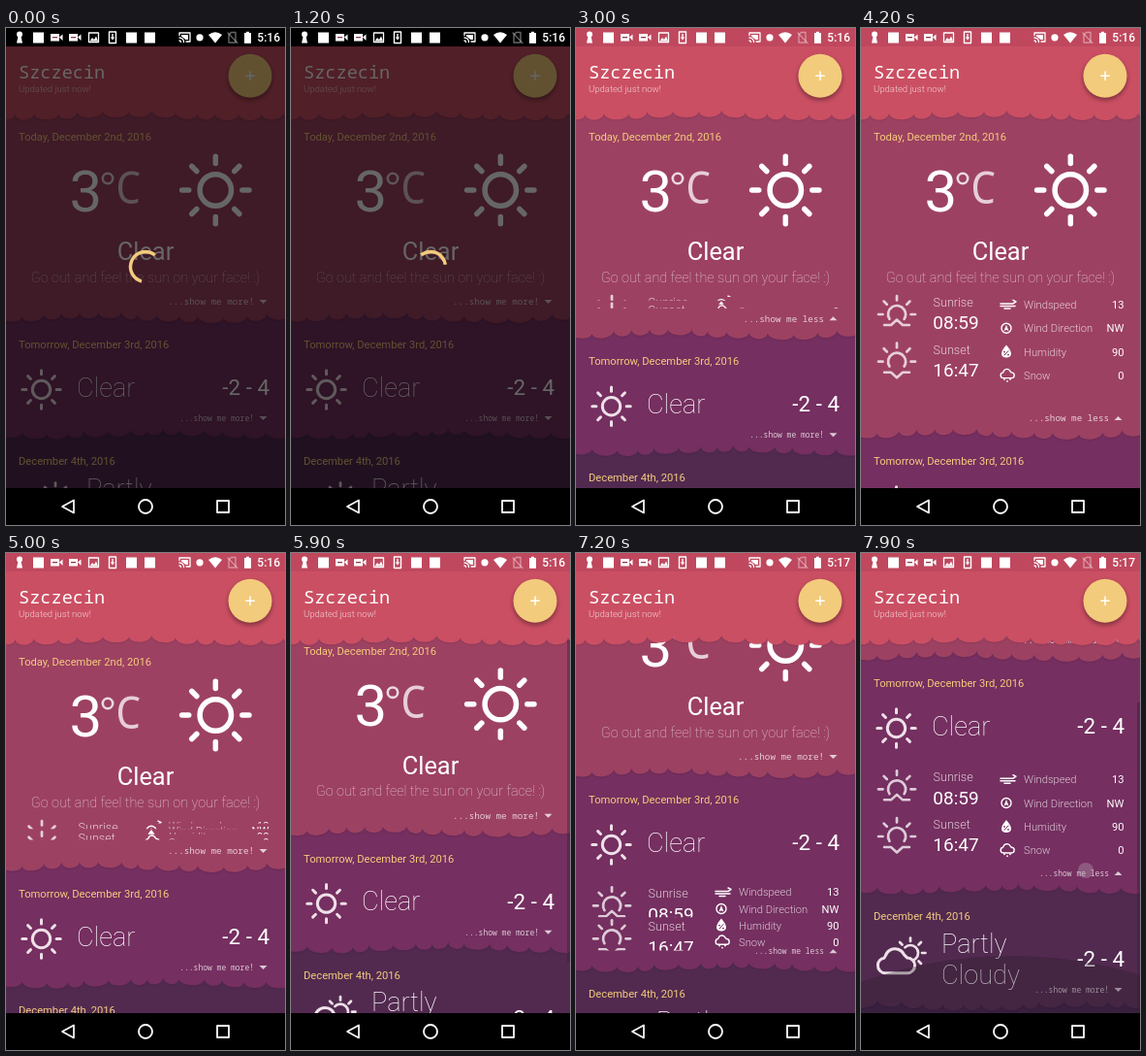
Recreate the animation shown at these times as an HTML page with a canvas. Size 288 px wide and 512 px high, loop 8 s.

```html
<!DOCTYPE html>
<html lang="en">
<head>
<meta charset="utf-8">
<title>Weather</title>
<style>
html, body { margin: 0; width: 100%; height: 100%; overflow: hidden; background: #000; }
canvas { display: block; width: 288px; height: 512px; }
</style>
</head>
<body>
<canvas id="stage"></canvas>
<script>
const W = 288, H = 512, LOOP = 8000, NAV = 474;
const TAU = Math.PI * 2;
const ROBOTO = 'Roboto, sans-serif';
const MONO = '"Noto Sans Mono", monospace';
const GOLD = '#f3cb7c', WHITE = '#fff', ICON = '#eee0e8';
const SOFT = 'rgba(255,255,255,.74)', PALE = 'rgba(255,255,255,.75)';

const canvas = document.getElementById('stage');
const c = canvas.getContext('2d');
const dpr = window.devicePixelRatio || 1;
canvas.width = W * dpr;
canvas.height = H * dpr;

const span = (t, a, b) => Math.min(1, Math.max(0, (t - a) / (b - a)));
const ease = u => (1 - Math.cos(Math.PI * u)) / 2;

// y is the middle of the capitals
function text(s, x, y, size, { weight = 400, color = WHITE, align = 'left', font = ROBOTO } = {}) {
  c.font = `${weight} ${size}px ${font}`;
  c.textAlign = align;
  c.fillStyle = color;
  c.fillText(s, x, y + size * 0.356);
}

function line(pts, width, color = WHITE, close = false) {
  c.beginPath();
  pts.forEach(([x, y], i) => i ? c.lineTo(x, y) : c.moveTo(x, y));
  if (close) c.closePath();
  c.lineWidth = width;
  c.strokeStyle = color;
  c.stroke();
}

function fill(pts, color = WHITE) {
  c.beginPath();
  pts.forEach(([x, y]) => c.lineTo(x, y));
  c.fillStyle = color;
  c.fill();
}

function arc(x, y, r, width, color = WHITE, from = 0, to = TAU) {
  c.beginPath();
  c.arc(x, y, r, from, to);
  c.lineWidth = width;
  c.strokeStyle = color;
  c.stroke();
}

function disc(x, y, r, color = WHITE) {
  c.beginPath();
  c.arc(x, y, r, 0, TAU);
  c.fillStyle = color;
  c.fill();
}

function rect(x, y, w, h, color = WHITE) {
  c.fillStyle = color;
  c.fillRect(x, y, w, h);
}

function clipped(y, h, draw) {
  c.save();
  c.beginPath();
  c.rect(0, y, W, h);
  c.clip();
  draw();
  c.restore();
}

// Panel filled down to a scalloped lower edge
function panel(y, color, seed) {
  let s = seed;
  const rnd = () => (s = (s * 16807) % 2147483647) / 2147483647;
  c.save();
  c.shadowColor = 'rgba(0,0,0,.1)';
  c.shadowBlur = 2 * dpr;
  c.shadowOffsetY = dpr;
  c.beginPath();
  c.moveTo(-20, -400);
  c.lineTo(-20, y - 3.5);
  let x = -8 - rnd() * 10, py = y - 3.5;
  c.lineTo(x, py);
  while (x < W + 10) {
    const w = 16 + rnd() * 11;
    const ny = y - 4.5 + 2.2 * Math.sin((x + seed) / 38) + rnd() * 2;
    c.bezierCurveTo(x + w * 0.08, py + 8, x + w * 0.92, ny + 8, x + w, ny);
    x += w;
    py = ny;
  }
  c.lineTo(W + 40, -400);
  c.fillStyle = color;
  c.fill();
  c.restore();
}

function ray(x, y, a, r0, r1, width, color) {
  const dx = Math.cos(a), dy = Math.sin(a);
  line([[x + dx * r0, y + dy * r0], [x + dx * r1, y + dy * r1]], width, color);
}

function sun(x, y, r, width, color) {
  arc(x, y, r, width, color);
  for (let i = 0; i < 8; i++) ray(x, y, i * TAU / 8, r * 1.7, r * 2.14, width, color);
}

function horizon(x, y, dir) {
  const col = 'rgba(255,255,255,.75)';
  arc(x, y, 9, 2.7, col, Math.PI * 0.82, Math.PI * 2.18);
  for (let i = 0; i < 5; i++) ray(x, y, Math.PI + i * Math.PI / 4, 14.5, 19, 2.7, col);
  const b = 11, tip = b - dir * 5.5;
  line([[x - 13, y + b], [x - 6, y + b], [x, y + tip], [x + 6, y + b], [x + 13, y + b]], 2.5, col);
}

function cloud(x, y, k) {
  c.beginPath();
  c.arc(x - 11 * k, y + 5 * k, 8 * k, Math.PI / 2, Math.PI * 1.45);
  c.arc(x - 1 * k, y - 2 * k, 10.5 * k, Math.PI * 1.1, Math.PI * 1.86);
  c.arc(x + 12 * k, y + 5 * k, 8 * k, Math.PI * 1.5, Math.PI * 2.5);
  c.closePath();
}

function partly(x, y) {
  const sx = x + 10, sy = y - 3;
  arc(sx, sy, 8, 2.7, ICON, Math.PI * 1.25, Math.PI * 2.35);
  for (let i = -3; i <= 1; i++) ray(sx, sy, i * TAU / 8, 12, 15.5, 2.7, ICON);
  cloud(x - 5, y + 5, 0.98);
  c.fillStyle = '#522a50';
  c.fill();
  c.lineWidth = 3;
  c.strokeStyle = ICON;
  c.stroke();
}

const smallIcons = [
  (x, y) => {
    line([[x - 8, y - 1], [x + 5, y - 1], [x + 8, y - 3], [x + 5, y - 4.5]], 1.5);
    line([[x - 8, y + 1.5], [x + 7, y + 1.5]], 1.5);
    line([[x - 4, y + 4], [x + 2, y + 4]], 1.5);
  },
  (x, y) => {
    arc(x - 2, y, 5, 1.4);
    fill([[x - 2, y - 3.5], [x + 0.5, y + 3], [x - 2, y + 1.6], [x - 4.5, y + 3]]);
  },
  (x, y) => {
    c.beginPath();
    c.moveTo(x - 2, y - 7);
    c.bezierCurveTo(x + 6, y + 2, x + 3, y + 6, x - 2, y + 6);
    c.bezierCurveTo(x - 7, y + 6, x - 10, y + 2, x - 2, y - 7);
    c.fillStyle = WHITE;
    c.fill();
    line([[x - 4, y + 3.5], [x, y - 1]], 1, '#752f60');
    disc(x - 4, y, 0.9, '#752f60');
    disc(x, y + 3, 0.9, '#752f60');
  },
  (x, y) => {
    cloud(x - 1, y - 2, 0.36);
    c.lineWidth = 1.4;
    c.strokeStyle = WHITE;
    c.stroke();
    [-3, 0, 3].forEach(d => disc(x - 1 + d, y + (d ? 4 : 6), 0.9));
  }
];

const facts = [['Windspeed', '13'], ['Wind Direction', 'NW'], ['Humidity', '90'], ['Snow', '0']];
const times = [['Sunrise', '08:59', 1], ['Sunset', '16:47', -1]];

function details(top, open) {
  if (open < 1) return;
  const h = 0.92 * open - 0.0009 * open * open;
  times.forEach(([name, hour, dir], i) => {
    const y = top + i * h / 2;
    clipped(y, h / 2, () => {
      horizon(37, y + 22, dir);
      text(name, 74.5, y + 9.5, 12.6, { weight: 300, color: SOFT });
      text(hour, 74.3, y + 30.5, 19);
    });
  });
  facts.forEach(([name, value], i) => {
    const y = top + i * h / 4, mid = y + Math.max(h / 8, 8) - 0.3;
    clipped(y, h / 4, () => {
      smallIcons[i](152, mid);
      text(name, 168, mid, 11.2, { weight: 300, color: SOFT });
      text(value, 271.5, mid, 11.2, { align: 'right' });
    });
  });
}

function toggle(y, size, open) {
  text(open ? '...show me less' : '...show me more!', 256, y, size,
    { font: MONO, align: 'right', color: SOFT });
  const d = open ? -2 : 2;
  fill([[261.5, y - d], [269.5, y - d], [265.5, y + d]], SOFT);
}

const date = (s, y) => text(s, 13, y, 11.2, { color: GOLD });

function today(s, open, isOpen) {
  date('Today, December 2nd, 2016', 112 - s);
  text('3', 65.5, 168 - s, 60);
  arc(105, 155 - s, 5.2, 2.6, 'rgba(255,255,255,.8)');
  text('C', 126.5, 165 - s, 45, { weight: 300, font: MONO, align: 'center', color: SOFT });
  sun(216.3, 167 - s, 16.2, 5.5);
  text('Clear', 144, 230 - s, 25.4, { align: 'center' });
  text('Go out and feel the sun on your face! :)', 144, 256.5 - s, 14.4,
    { weight: 100, align: 'center', color: PALE });
  details(273 - s, open);
  toggle(282 + open - s, 9.27, isOpen);
}

function dayRange(y) {
  text('-2 - 4', 272, y, 22.4, { align: 'right' });
}

function tomorrow(y, open, isOpen) {
  date('Tomorrow, December 3rd, 2016', y);
  sun(36.5, y + 46.5, 9.2, 3, ICON);
  text('Clear', 73, y + 44, 27.2, { weight: 100 });
  dayRange(y + 44);
  details(y + 87.3, open);
  toggle(y + 76 + open, 8, isOpen);
}

function later(y) {
  date('December 4th, 2016', y);
  partly(41, y + 41);
  text('Partly', 83, y + 28, 27.2, { weight: 100 });
  text('Cloudy', 83, y + 60, 27.2, { weight: 100 });
  dayRange(y + 44);
  toggle(y + 76, 8, false);
}

function header() {
  panel(91, '#cb4f63', 77);
  text('Szczecin', 13, 45, 18.6, { font: MONO });
  text('Updated just now!', 13, 62.7, 9.5, { weight: 300, color: SOFT });
  c.save();
  c.shadowColor = 'rgba(0,0,0,.4)';
  c.shadowBlur = 5 * dpr;
  c.shadowOffsetY = 2.5 * dpr;
  disc(252, 49.3, 22.5, GOLD);
  c.restore();
  line([[247.8, 49.3], [256.2, 49.3]], 1.5);
  line([[252, 45.1], [252, 53.5]], 1.5);
}

function camera(x) {
  rect(x - 6, 6, 9, 7.5);
  fill([[x + 3, 9.5], [x + 6.5, 6.5], [x + 6.5, 13]]);
  rect(x - 4, 9, 5, 1.3, '#8a3a4a');
}

function statusBar(t, k) {
  rect(0, 0, W, 19, '#bf485e');
  rect(0, 0, W, 19, `rgba(0,0,0,${k})`);
  disc(14, 6.5, 3);
  fill([[12.6, 8], [15.4, 8], [17, 15.5], [11, 15.5]]);
  rect(28, 4.5, 11, 11);
  camera(52);
  camera(71);
  line([[85.5, 5], [95.5, 5], [95.5, 14.5], [85.5, 14.5]], 1.3, WHITE, true);
  fill([[86.5, 13.5], [89, 10], [91, 12], [93, 8.5], [95, 13.5]]);
  line([[106.5, 4], [113.5, 4], [113.5, 15.5], [106.5, 15.5]], 1.4, WHITE, true);
  rect(109.3, 6, 1.4, 4);
  fill([[107.8, 9.5], [112.2, 9.5], [110, 12.5]]);
  rect(124, 4.5, 11, 11);
  rect(143, 4.5, 11, 11);
  line([[179, 7.5], [179, 5], [190, 5], [190, 14], [186, 14]], 1.3);
  fill([[181, 7], [188, 7], [188, 12], [185.5, 12], [181, 8.5]]);
  arc(179, 14.5, 4.5, 1.3, WHITE, -Math.PI / 2, 0);
  arc(179, 14.5, 1.5, 1.3, WHITE, -Math.PI / 2, 0);
  disc(200, 9.8, 3.6);
  c.beginPath();
  c.moveTo(216, 15.5);
  c.lineTo(209, 7);
  c.quadraticCurveTo(216, 1.5, 223, 7);
  c.fillStyle = WHITE;
  c.fill();
  const dim = 'rgba(255,255,255,.4)';
  line([[230, 7], [232.5, 4.5], [237, 4.5], [237, 15], [230, 15]], 1.4, dim, true);
  line([[229, 5], [239, 15.5]], 1.2, dim);
  rect(246, 5, 7, 10.8);
  rect(248, 3.8, 3, 1.5);
  text(t < 6900 ? '5:16' : '5:17', 283, 10, 12, { weight: 500, align: 'right' });
}

function navBar() {
  rect(0, NAV, W, H - NAV, '#000');
  line([[58, 493], [70, 486.5], [70, 499.5]], 1.7, WHITE, true);
  arc(144, 493, 7, 1.8);
  line([[218, 487], [230, 487], [230, 499], [218, 499]], 1.8, WHITE, true);
}

function spinner(t) {
  const turn = t / 1333 + 0.31, n = Math.floor(turn), p = turn - n;
  const head = ease(span(p, 0, 0.5)), tail = ease(span(p, 0.5, 1));
  const base = 105 / 360 + t / 2000 + n * 0.75;
  c.lineCap = 'butt';
  arc(144, 246, 15.5, 3.5, GOLD, (base + tail * 0.75) * TAU, (base + head * 0.75 + 0.05) * TAU);
  c.lineCap = 'round';
}

function scrollBar(t, s, open) {
  const a = t < 7000 ? span(t, 5750, 5850) * (1 - span(t, 6500, 6750)) : span(t, 7420, 7520);
  if (!a) return;
  const view = NAV - 19, total = view + 72 + open;
  rect(285, 19 + view * s / total, 3, view * view / total, `rgba(50,30,60,${0.4 * a})`);
}

function draw(t) {
  c.setTransform(dpr, 0, 0, dpr, 0, 0);
  c.lineCap = c.lineJoin = 'round';
  const open1 = 120 * (ease(span(t, 2877, 3377)) - ease(span(t, 4652, 5152)));
  const open2 = 120 * ease(span(t, 6896, 7396));
  const pull = ease(span(t, 7420, 7820));
  const s = 72 * ease(span(t, 5740, 6360)) + 120 * pull;
  const y1 = 299 + open1 - s, y2 = y1 + 120 + open2, y3 = y2 + 120;

  rect(0, 0, W, H, '#40234a');
  panel(y3, '#522a50', 911);
  later(y2 + 27);
  panel(y2, '#752f60', 523);
  tomorrow(y1 + 27, open2, t >= 6896);
  panel(y1, '#9d4162', 348);
  today(s, open1, t >= 2877 && t < 4652);

  const glow = span(t, 7700, 7900);
  if (glow) clipped(0, NAV, () => disc(155, NAV - 59 * glow + 462, 462, `rgba(40,25,40,${0.32 * glow})`));
  scrollBar(t, s, open2);
  header();

  const k = Math.pow(1 - span(t, 1700, 2000), 1.7);
  if (k) rect(0, 19, W, NAV - 19, `rgba(0,0,0,${0.6 * k})`);
  if (t < 1720) spinner(t);
  statusBar(t, k);
  if (t >= 7420) disc(232, 447 - 120 * pull, 8, 'rgba(190,170,185,.35)');
  navBar();
}

const start = performance.now();
function tick() {
  draw((performance.now() - start) % LOOP);
  requestAnimationFrame(tick);
}
tick();
</script>
</body>
</html>
```
